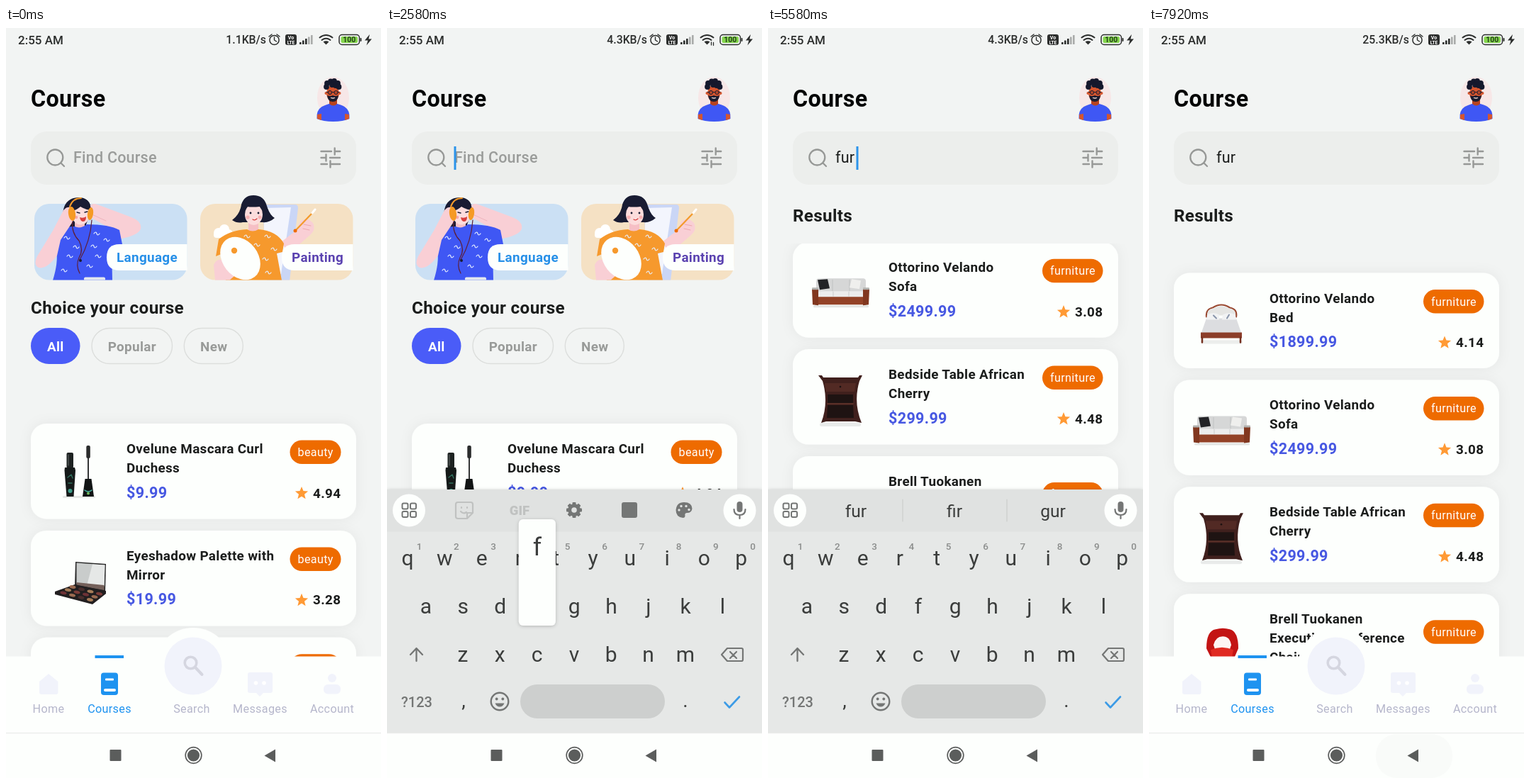
Write an HTML page that moves like this. It is 529 by 1058 pixels and loops after 8000 ms.

```html
<!DOCTYPE html>
<html lang="en">
<head>
<meta charset="utf-8">
<title>Course search</title>
<style>
html, body { margin: 0; width: 100%; height: 100%; overflow: hidden; background: #f2f4f3; }
svg { display: block; width: 529px; height: 1058px; font-family: Roboto, sans-serif; }
text { white-space: pre; }
</style>
</head>
<body>
<svg id="stage" viewBox="0 0 529 1058" xmlns="http://www.w3.org/2000/svg"></svg>
<script>
const LOOP = 8000, DP = 1.347, INK = '#1b1d1c', PAPER = '#fdfffd', BLUE = '#1e93f0';

// Drawing helpers
const rect = (x, y, w, h, r, fill, more = '') =>
  `<rect x="${x}" y="${y}" width="${w}" height="${h}" rx="${r}" fill="${fill}" ${more}/>`;
const dot = (x, y, r, fill, more = '') => `<circle cx="${x}" cy="${y}" r="${r}" fill="${fill}" ${more}/>`;
const oval = (x, y, rx, ry, fill, turn = 0) =>
  `<ellipse cx="${x}" cy="${y}" rx="${rx}" ry="${ry}" fill="${fill}" transform="rotate(${turn} ${x} ${y})"/>`;
const shape = (d, fill, more = '') => `<path d="${d}" fill="${fill}" ${more}/>`;
const line = (d, color, w, more = '') =>
  `<path d="${d}" fill="none" stroke="${color}" stroke-width="${w}" stroke-linecap="round" stroke-linejoin="round" ${more}/>`;
const text = (s, x, y, size, weight, fill, more = '') =>
  `<text x="${x}" y="${y}" font-size="${size}" font-weight="${weight}" fill="${fill}" ${more}>${s}</text>`;
const label = (s, x, y, dp, weight, fill) =>
  text(s, x, y, dp * DP, weight, fill, 'letter-spacing=".34"');
const mid = (s, x, y, size, weight, fill, more = '') =>
  text(s, x, y, size, weight, fill, 'text-anchor="middle" ' + more);
const group = (id, body, more = '') => `<g id="${id}" ${more}>${body}</g>`;

// Product pictures, y measured from the card top
const mascara =
  rect(80, 102, 46, 3, 1.5, '#e6e8e6') +
  rect(85.5, 41, 9.5, 22, 2, '#1d2221') + line('M88 44v15', '#59605e', 1.2) +
  shape('M83 62h14l1 4-2.5 37h-10l-3-37z', '#151a19') +
  line('M87 76l5-4 2 5M88 84h5', '#2f6f5c', 1.4) + dot(90.5, 95, 3, '#3f9d8a') +
  line('M116 32v48', '#1d2020', 1.8) + rect(113.3, 31, 5.5, 18, 2, '#2a2c2c') +
  shape('M111.5 78h9l3.5 25h-16z', '#121515') + line('M111 94q5 4 10 0', '#45b0a0', 1.6) + dot(116, 98.500, 2, '#70b85c');

const shades = ['#6e3236', '#9a6a50', '#4a2e2c', '#a67c58', '#7c3c38'];
let pans = '';
for (let r = 0; r < 3; r++) for (let c = 0; c < 4; c++)
  pans += oval(81 + c * 12.5 + r * 6.5, 88 + c * 3.2 - r * 4.2, 4.6, 2.2, shades[(r * 3 + c) % 5], 10);
const palette =
  shape('M98 44l43 3-1 40-43-9z', '#2a2a2a') + shape('M99.5 45.500l40 3-1 30-39-4z', '#c9cccb') +
  shape('M122 47.500l17.500 1-1 30-24-3z', '#e6e8e7') + shape('M99.500 73l39 4v7l-39-7z', '#74605a') +
  shape('M69 86l28-10 44 9v4l-19 15-53-14z', '#221f20') + pans;

const bed =
  rect(73, 95, 59, 5, 2.5, '#eceeec') + line('M81 62q-1-11 9-13 12-8 24 0 11 2 9 13', '#9a4a32', 2.2) +
  shape('M82 60q0-9 8-10 12-7 23 0 9 1 9 10z', '#e5e5e3') +
  shape('M81 64h42l8 23h-58z', '#dcdde0') + shape('M82 59q9-5 17 0v7h-18zM104 59q9-5 18 0l1 7h-20z', '#f1f2f3') +
  line('M91 60l4 4M113 59l-3 5', '#8994aa', 2) +
  shape('M73 84h58v8h-58z', '#8b3d29') + line('M75 91v7M129 91v7', '#75301f', 2.5);

const sofa =
  rect(64, 89, 78, 3, 1.5, '#e3e5e3') + rect(68, 51, 70, 23, 4, '#d6d7d7') +
  line('M91 53v20M115 53v20', '#bfc1c1', 1) +
  shape('M70 53l14-1 3 13-14 2z', '#222326') + shape('M118 52l13 2-2 12-14-2z', '#efefed') +
  rect(71, 69, 64, 8, 2, '#ececec') + line('M92 70v6M114 70v6', '#c9cbcb', 1) +
  rect(66, 77, 73, 11, 1, '#934227') + shape('M62 66h9v23l-8-1zM134 66h9l-1 22-8 1z', '#81371f') +
  rect(62, 64, 9, 3, 1, '#b2b2af') + rect(134, 64, 9, 3, 1, '#b2b2af');

const bedside =
  rect(73, 104, 58, 5, 2.5, '#e9ebea') +
  shape('M71 37h5l2 3h49l2-3h4l-4 8q-9 30 3 59l-9-2h-41l-7 2q11-29 2-59z', '#40201d') +
  shape('M80 48h44l-2 12h-40z', '#522a24') + shape('M84 64h36v12h-36zM84 79h36l1 18h-38z', '#1e1312') +
  line('M84 77h36', '#5a3028', 2) + dot(102, 53, 1.3, '#1a1010');

const chair =
  shape('M81 77q0-25 13-27 10-3 20 0 12 3 12 27l-6 14h-32z', '#c31414') +
  shape('M91 72q3-12 13-12t12 12l-2 6h-21z', '#fdf5f4') + shape('M87 79q16-7 32 0l-3 16h-26z', '#e02a22');

const star = Array.from({ length: 10 }, (_, i) => {
  const a = i * Math.PI / 5, r = i % 2 ? 4.2 : 9.6;
  return [(417 + r * Math.sin(a)).toFixed(1), (98.5 - r * Math.cos(a)).toFixed(1)];
}).join(' ');

function card([lines, price, rating, tag, art], i, top) {
  const tall = lines.length > 2 ? 27 : 0;
  const badge = tag === 'beauty' ? 400.5 : 387;
  return `<g transform="translate(0 ${top + i * 150.9})">` +
    rect(35, 0, 459, 134.5 + tall, 22, PAPER, 'filter="url(#soft)"') + art +
    lines.map((s, n) => label(s, 170, 42 + 27 * n, 14, 700, INK)).join('') +
    label(price, 170, 104.5 + tall, 16, 700, '#4758e2') +
    rect(badge, 23.5 + tall / 2, 472.5 - badge, 33.5, 16.7, '#ee6b00') +
    label(tag, badge + 11, 46 + tall / 2, 12, 400, '#fff') +
    `<g transform="translate(0 ${tall})"><polygon points="${star}" fill="#ff9a35"/>` +
    label(rating, 433, 104.5, 14, 700, INK) + '</g></g>';
}
const beauty = [
  [['Ovelune Mascara Curl', 'Duchess'], '$9.99', '4.94', 'beauty', mascara],
  [['Eyeshadow Palette with', 'Mirror'], '$19.99', '3.28', 'beauty', palette],
  [['Powder Canister'], '$14.99', '3.82', 'beauty', '']
];
const furniture = [
  [['Ottorino Velando', 'Bed'], '$1899.99', '4.14', 'furniture', bed],
  [['Ottorino Velando', 'Sofa'], '$2499.99', '3.08', 'furniture', sofa],
  [['Bedside Table African', 'Cherry'], '$299.99', '4.48', 'furniture', bedside],
  [['Brell Tuokanen', 'Executive Conference', 'Chair'], '$499.99', '4.11', 'furniture', chair]
];
const list = (items, top) => items.map((p, i) => card(p, i, top)).join('');

// Status bar
const statusBar =
  text('2:55 AM', 17, 22.5, 17, 500, '#2c2e2d') +
  text('', 367, 22, 15.8, 500, '#2c2e2d', 'id="speed" text-anchor="end"') +
  dot(378.5, 17, 6.6, 'none', 'stroke="#2c2e2d" stroke-width="1.5"') +
  line('M378.5 13v4l3 2M371 12l4-3M386 12l-4-3', '#2c2e2d', 1.4) +
  rect(394, 9, 16, 15, 3, '#2c2e2d') + mid('Vo', 402, 16, 7, 700, '#fff') + mid('LTE', 402, 22.5, 6.5, 700, '#fff') +
  [0, 1, 2, 3, 4].map(i => rect(414 + i * 4, 20 - i * 2.5, 2.6, 3 + i * 2.5, 0.6, i < 3 ? '#2c2e2d' : '#a9abaa')).join('') +
  line('M442.5 13.5q9-7 18 0M445.5 17q6-4.500 12 0', '#2c2e2d', 2) + shape('M447.5 19.5q4-2.500 8 0l-4 4z', '#2c2e2d') +
  group('wifiMark', rect(456, 19, 6, 7, 1, '#f2f4f3') + line('M457.5 24v-4M460.5 20.5v4', '#2c2e2d', 1.3)) +
  rect(470, 9.5, 28.5, 14, 4, 'none', 'stroke="#2c2e2d" stroke-width="1.5"') + rect(472.5, 12, 23.5, 9, 2, '#84d64c') +
  mid('100', 484.3, 20.3, 10.5, 700, '#24401a') + rect(499.5, 14, 2, 5, 1, '#2c2e2d') +
  shape('M513 9l-7 8.5h4.500l-2 7 7.500-9h-4.500z', '#2c2e2d');

// Header and search field
const avatar =
  oval(461.5, 98, 22.5, 29, '#f7e7e7') +
  shape('M438.500 128q-1-12 7-17 4-2 10-4h12q7 2 10 4 8 5 7 17-9 4-23 4t-23-4z', '#3f57f4') +
  shape('M456 98h11v9q-5 5-11 0z', '#b8431f') + oval(461, 92, 9, 11.5, '#d4552e') +
  dot(451.5, 92, 2, '#d4552e') + dot(470.5, 92, 2, '#d4552e') +
  shape('M453 95q4 2 8 0 4 2 8 0-1 9-8 9t-8-9z', '#1b1d30') + line('M458.5 98.5q3 1 5 0', '#f4dcd4', 1.3) +
  [[452, 83], [453, 78], [458, 75.5], [463, 75], [468, 78], [469.5, 83], [460, 80], [465, 81]].map(p => dot(...p, 3.9, '#15182c')).join('') +
  line('M452 90.5h18', '#1b1d30', 1) + dot(457, 91, 2.6, '#b5482a', 'stroke="#1b1d30"') + dot(465.5, 91, 2.6, '#b5482a', 'stroke="#1b1d30"') +
  shape('M439 122l6-1v9l-6-2zM478 121l6 1v6l-6 2z', '#d4552e');
const header =
  text('Course', 35, 111, 24 * DP, 700, '#050606', 'letter-spacing=".34"') + avatar +
  rect(35, 146, 459, 75, 22, '#eceeec') +
  dot(69.3, 182.5, 11, 'none', 'stroke="#969896" stroke-width="2.3"') + line('M77.5 190.500l4.500 4.500', '#969896', 2.3) +
  line('M444.5 174H459M463.7 169.5v9M463.7 174h7.500M444.5 183h7M451.5 178.5v9M457 183h14M444.5 192h8.500M457.5 187.5v9M457.5 192h13.500', '#969896', 2.4) +
  text('', 95, 190, 16 * DP, 400, INK, 'id="query" letter-spacing=".2"') +
  rect(94.5, 167, 3, 33, 0, '#2b93ea', 'id="caret"');

// Banners
const SKIN = '#f9cfd5', HAIR = '#191c33';
const squiggles = spots => line(spots.map(([x, y]) => `M${x} ${y}q3-4 4 0t4 0`).join(''), '#e8f0ff', 1.2);
const listener =
  shape('M76 284q-2-8 4-18 0-26 22-27 18 0 18 19l-8 22-14 6q-12 2-22-2z', HAIR) +
  shape('M146 282l-27-15q-6-6-2-15 4-6 12-3l48 18q15 6 13 16-2 8-22 13l-14 3z', SKIN) +
  line('M119 262l22 10', '#eeb4bd', 1) +
  shape('M97 272h14v14h-14z', '#f6bfc5') +
  shape('M68 289q14-10 29-9 8 4 17-3 32 0 46 8l4 20-15 3 1 48h-84q8-26 5-42-8 7-14 2z', '#3f57f4') +
  oval(105, 263, 12.5, 14.5, '#fcdcdc', -8) + shape('M86 260q0-20 17-20 16 0 17 17-9-1-15-5-8 7-19 8z', HAIR) +
  shape('M92 253q-9-2-13 8l-13 25-22 36q-6 12 2 16 11 3 26-17l5-22q8-12 16-24 8-14-1-22z', SKIN) +
  line('M100 260l4 1M111 260l4-1', HAIR, 1.3) + shape('M104 267q5 2 9-1 0 7-4 7t-5-6z', '#d8403f') +
  dot(99, 267, 2.3, '#f5a6a8') +
  line('M90 252q4-12 16-12', '#f39a2c', 2) +
  oval(93, 262, 5, 10, '#f59a24', -8) + oval(119, 262, 4, 9, '#f59a24', 8) +
  line('M94 273q-2 16 9 27 7 13 0 24-5 11 1 22M121 271q-2 30-17 56', '#5d1e35', 1.2) + dot(105, 328, 2, HAIR) +
  squiggles([[82, 296], [124, 290], [120, 308], [86, 322], [78, 342], [114, 336], [138, 299], [126, 322], [95, 309]]) +
  rect(110, 351.5, 30, 5, 2, '#e4e7ee');
const painter =
  shape('M362 249h46q4 0 4 5l-12 103h-32z', '#cad6f6') + shape('M364 254l38-1-14 94h-24z', '#f3f5fd') +
  dot(300, 289, 7, '#fff') + dot(308, 284, 7, '#fff') + dot(314, 290, 6, '#fff') + rect(293, 288, 27, 8, 4, '#fff') +
  shape('M388 302l22-17 5-12q9-8 18 2 5 9-4 17l-30 26z', SKIN) +
  line('M408 286l25-26', '#f39a2c', 2.2) + line('M432 261l4-5', '#fff', 3) + dot(408, 286, 2.5, '#ee6b00') +
  line('M420 277l10 2M419 283l9 2', '#eda7ae', 1) +
  shape('M319 271q11-8 13-22 4-13 17-13 15 0 19 15 4 13 11 17-8 7-17 6h-28q-8 2-15-3z', HAIR) +
  shape('M342 272h14v14q-8 4-14 0z', '#f6bfc5') +
  shape('M300 298q16-13 40-14 8 5 16 0 26 2 36 20l-2 12-8 2 7 38h-79l-4-38-10 4z', '#f6992d') +
  oval(349.5, 263, 12.5, 15, '#fcdcdc') + shape('M333 261q0-23 16-24 15 1 17 22-6-2-8-7-11 1-18 0-2 6-7 9z', HAIR) +
  dot(345, 261, 1.4, HAIR) + dot(356, 261, 1.4, HAIR) + line('M348 270q3 2 6-1', '#d8403f', 1.3) +
  dot(341, 267, 2.6, '#f8b1b3') + dot(358, 267, 2.4, '#f8b1b3') +
  squiggles([[336, 294], [365, 294], [374, 312], [362, 326], [366, 345], [350, 306]]) +
  shape('M293 334q5-10 13-6l16 22-7 6h-20z', SKIN) +
  oval(330.5, 325, 25, 33, PAPER, -38) + dot(322, 314, 4.2, '#f6992d');
const banner = (x, fill, art, name, left, color) =>
  rect(x, 248, 215.5, 107.5, 21, fill) + `<g clip-path="url(#banner)">${art}</g>` +
  shape(`M${x + 215.5} 305H${left + 18}q-18 0-18 18.5t18 18.5H${x + 215.5}z`, PAPER) +
  label(name, left + 14, 330, 14, 700, color);
const pill = (x, w, name) =>
  rect(x, 423.5, w, 50, 25, 'none', 'stroke="#dcdedc" stroke-width="1.4"') + label(name, x + 22.7, 456, 14, 700, '#989a98');
const home =
  banner(40, '#cbe0f4', listener, 'Language', 142, '#2790e8') +
  banner(274, '#f5e1c4', painter, 'Painting', 389, '#5a42b0') +
  label('Choice your course', 35, 402.5, 18, 700, INK) +
  rect(35, 423, 69.5, 51, 25.5, '#4a5cf8') + label('All', 58, 456, 14, 700, '#fff') +
  pill(121, 113.5, 'Popular') + pill(251.3, 83, 'New') +
  `<g clip-path="url(#homeList)">${list(beauty, 558)}</g>`;
const results =
  label('Results', 35, 273, 18, 700, INK) +
  `<g clip-path="url(#resultList)">${group('first', list(beauty, 345.5))}${group('second', list(furniture, 345.5))}</g>`;

// Bottom bars
const PALE = '#f1f3fb', LILAC = '#b5b6cb';
const tabBar =
  dot(264, 900, 54, PAPER) + rect(0, 886.5, 529, 110, 0, PAPER) + dot(264, 900, 40.5, PALE) +
  dot(260.5, 895.5, 8.3, 'none', 'stroke="#d5d6e0" stroke-width="3.6"') + line('M267 902l9.500 10', '#d5d6e0', 4) +
  rect(125.5, 885, 40.5, 4, 0, BLUE) +
  shape('M47 922l13-11 13.5 11v15q0 3-3 3h-20.500q-3 0-3-3z', PALE) +
  rect(134, 909.5, 24, 31.5, 4, BLUE) + rect(140, 917.5, 12, 3, 1, '#fff') + rect(138, 932, 17, 4, 2, '#fff') +
  shape('M344 909h29q3 0 3 3v23q0 3-3 3h-10l-5 5-5-5h-9q-3 0-3-3v-23q0-3 3-3z', PALE) +
  dot(352.5, 924, 2.8, '#fff') + dot(364, 924, 2.8, '#fff') +
  dot(460, 917, 6, PALE) + rect(448, 926, 24, 13.5, 6, PALE) +
  [['Home', 60], ['Courses', 146], ['Search', 262], ['Messages', 358.5], ['Account', 460]].map(([s, x], i) =>
    mid(s, x, 966, 12 * DP, 400, i === 1 ? BLUE : LILAC, 'letter-spacing=".34"')).join('');
const systemBar =
  rect(0, 994, 529, 64, 0, PAPER) + rect(0, 994, 529, 1.2, 0, '#e9ebe9') +
  rect(320, 996, 108, 62, 30, '#f9fbf9', 'id="ripple"') +
  rect(146.5, 1018, 16, 16, 1, '#5b5d5c') +
  dot(264.5, 1026, 11.3, 'none', 'stroke="#5b5d5c" stroke-width="1.7"') + dot(264.5, 1026, 8.6, '#5b5d5c') +
  shape('M380 1017.5v18l-15.500-9z', '#5b5d5c');

// Keyboard
const KEY = '#3b3d3c', DIM = '#747675';
const rows = [['qwertyuiop', 29, 748], ['asdfghjkl', 55, 816], ['zxcvbnm', 107, 884]];
const keyAt = {};
const keys = rows.map(([letters, x, y]) => [...letters].map((c, i) => {
  keyAt[c] = [x + i * 52.3, y];
  return mid(c, x + i * 52.3, y + 10, 30, 400, KEY) +
    (y === 748 ? mid((i + 1) % 10, x + i * 52.3 + 16.5, 736, 13.5, 500, '#8b8d8c') : '');
}).join('')).join('');
const gear = Array.from({ length: 8 }, (_, i) =>
  `<rect x="261.5" y="669" width="5" height="6" rx="1" fill="${DIM}" transform="rotate(${i * 45} 264 680)"/>`).join('');
const tools =
  line('M100 669h18q3 0 3 3v12l-8 8h-13q-3 0-3-3v-17q0-3 3-3zM113 691v-7h7M104 682q4 4 8 1M105 676v1M113 676v1', '#c0c2c1', 2.2) +
  mid('GIF', 187, 687, 18.5, 900, '#c0c2c1') +
  gear + dot(264, 680, 6.3, 'none', `stroke="${DIM}" stroke-width="5"`) +
  rect(331, 669, 22, 22, 3, DIM) +
  shape('M419 669q11 0 11.5 9-1 6-7 6-4 0-3 4 0 3-3 3-10-1-10-11 1-11 11.5-11z', DIM) +
  [[412, 680], [415, 674.5], [422, 674.5], [426, 679.5]].map(p => dot(...p, 1.7, '#e0e2e1')).join('');
const hints = line('M190 665v31M337 665v31', '#cbcdcc', 1.2) +
  [124, 263, 402].map((x, i) => mid('', x, 690, 24.6, 400, KEY, `id="hint${i}"`)).join('');
const keyboard =
  rect(0, 651, 529, 345, 0, '#e6e8e7', 'filter="url(#edge)"') + rect(0, 651, 529, 59.5, 0, '#e0e2e1') +
  dot(31, 680.5, 23, PAPER) + dot(497.5, 680.5, 23, PAPER) +
  [0, 1, 2, 3].map(i => rect(21.5 + i % 2 * 11.5, 670.5 + (i >> 1) * 11.5, 8, 8, 2, 'none', `stroke="${DIM}" stroke-width="2"`)).join('') +
  rect(493.5, 668, 8, 15, 4, DIM) + line('M489.5 679q0 8 8 8t8-8M497.5 687v5', DIM, 2.2) +
  group('tools', tools) + group('hints', hints) + keys +
  line('M41.5 893v-17M33 884l8.500-9 8.500 9', DIM, 2.3) +
  line('M480 875h20q2 0 2 2v14q0 2-2 2h-20l-8-9zM484 880l9 9M493 880l-9 9', DIM, 2.2) +
  mid('?123', 42, 958, 20, 500, DIM) + mid(',', 108, 958, 28, 400, KEY) + mid('.', 421, 958, 28, 400, KEY) +
  dot(159, 950, 12.3, 'none', `stroke="${DIM}" stroke-width="2.4"`) + dot(154.7, 946.5, 1.9, DIM) + dot(163.3, 946.5, 1.9, DIM) +
  shape('M152.5 952.5h13q-2 5-6.5 5t-6.5-5z', DIM) +
  rect(188, 926, 204, 48, 24, '#cdcfce') + line('M476.5 951.5l6.5 7 14-15', '#3c9be6', 2.6) +
  group('popup', rect(-26, -123, 52, 150, 6, PAPER, 'filter="url(#edge)"') + mid('', 0, -72, 35.5, 400, KEY, 'id="popupKey"'));

const clip = (id, y, h) => `<clipPath id="${id}"><rect y="${y}" width="529" height="${h}"/></clipPath>`;
const shadow = (id, dy, blur, alpha) =>
  `<filter id="${id}" x="-20%" y="-40%" width="140%" height="180%"><feDropShadow dx="0" dy="${dy}" stdDeviation="${blur}" flood-opacity="${alpha}"/></filter>`;
document.getElementById('stage').innerHTML =
  '<defs>' + clip('homeList', 517, 541) + clip('resultList', 304, 754) + clip('deck', 0, 995) + clip('banner', 230, 125.5) +
  shadow('soft', 0, 9, .055) + shadow('edge', 1, 2.5, .22) + '</defs>' +
  rect(0, 0, 529, 1058, 0, '#f2f4f3') + group('home', home) + group('results', results) +
  header + statusBar + tabBar + `<g clip-path="url(#deck)">${group('keyboard', keyboard)}</g>` + systemBar;

// Timeline: each step is [time, value]
const typed = [[0, ''], [1250, ''], [2670, 'f'], [3170, 'fu'], [4170, 'fur']];
const caretX = [94.5, 102.5, 114.5, 124.5];
const speeds = [[0, '1.1KB/s'], [1670, '4.3KB/s'], [5670, '25.3KB/s']];
const suggestions = [[0, []], [2670, ['f', 'for', 'from']], [3250, ['fu', 'funny', 'fun']], [4250, ['fur', 'fir', 'gur']]];
const presses = [['f', 2500, 2670], ['u', 3080, 3170], ['r', 4090, 4170]];
const scroll = [[4780, 0], [4920, 28], [5080, 115], [5250, 205], [5420, 238], [5580, 195], [5750, 60], [5880, 0]];
const slide = [[1400, 344], [1480, 210], [1570, 70], [1680, 0], [7640, 0], [7730, 80], [7820, 250], [7900, 344]];

const stepAt = (steps, t) => steps.filter(s => s[0] <= t).pop();
function tween(steps, t) {
  const i = steps.findIndex(s => s[0] > t);
  if (i < 0) return steps[steps.length - 1][1];
  if (i === 0) return steps[0][1];
  const [t0, a] = steps[i - 1], [t1, b] = steps[i];
  return a + (b - a) * (t - t0) / (t1 - t0);
}
const el = {};
document.querySelectorAll('[id]').forEach(e => el[e.id] = e);
const show = (e, on) => e.setAttribute('display', on ? 'inline' : 'none');
const move = (e, x, y) => e.setAttribute('transform', `translate(${x} ${y})`);

function draw(t) {
  const [since, word] = stepAt(typed, t);
  el.query.textContent = word || 'Find Course';
  el.query.setAttribute('fill', word ? INK : '#9a9c9a');
  el.query.setAttribute('font-weight', word ? 400 : 500);
  el.caret.setAttribute('x', caretX[word.length]);
  show(el.caret, t >= 1250 && Math.floor((t - since) / 500) % 2 === 0);
  el.speed.textContent = stepAt(speeds, t)[1];
  show(el.wifiMark, t >= 1670 && t < 2750 || t >= 5670 && t < 6830);

  show(el.home, !word);
  show(el.results, word);
  show(el.first, word === 'f');
  show(el.second, word.length > 1);
  move(el.second, 0, -tween(scroll, t));

  const drop = tween(slide, t);
  move(el.keyboard, 0, drop);
  show(el.keyboard, drop < 344);
  const words = stepAt(suggestions, t)[1];
  show(el.tools, !words.length);
  show(el.hints, words.length);
  [0, 1, 2].forEach(i => el['hint' + i].textContent = words[i] || '');
  const press = presses.find(p => t >= p[1] && t < p[2]);
  show(el.popup, press);
  if (press) {
    el.popupKey.textContent = press[0];
    move(el.popup, ...keyAt[press[0]]);
  }
  show(el.ripple, t >= 7580);
}
function tick() {
  draw(performance.now() % LOOP);
  requestAnimationFrame(tick);
}
tick();
</script>
</body>
</html>
```
